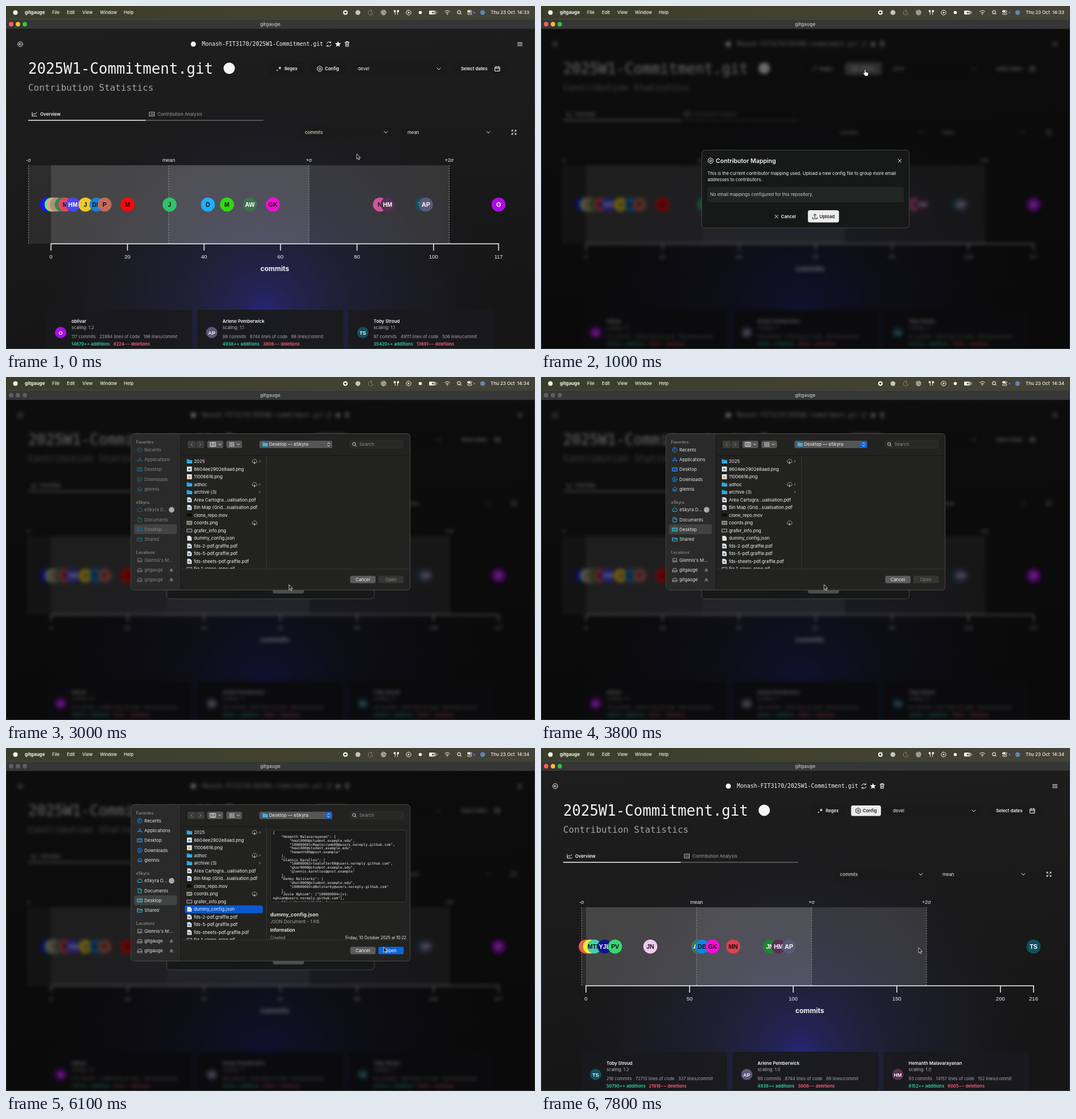
Animation, 929 px wide and 603 px high, one loop 8000 ms. Source, as an HTML page:

```html
<!DOCTYPE html>
<html lang="en">
<head>
<meta charset="utf-8">
<title>gitgauge</title>
<style>
html, body { margin: 0; width: 100%; height: 100%; overflow: hidden; background: #111; }
svg { display: block; width: 929px; height: 603px; font-family: Inter, sans-serif; }
text { white-space: pre; fill: #f4f4f4; }
.mono, .code { font-family: "DejaVu Sans Mono", monospace; }
.arial { font-family: "Liberation Sans", sans-serif; }
.b { font-weight: 600; }
.bb { font-weight: 700; }
.m { font-weight: 500; }
.mid { text-anchor: middle; }
.end { text-anchor: end; }
.line { fill: none; stroke: #f4f4f4; stroke-width: 1; stroke-linecap: round; stroke-linejoin: round; }
#side text { fill: #858585; }
#side .line { stroke: #2b6580; }
#side .loc .line { stroke: #777; }
#side.on .item { fill: #e4e4e4; }
#side.on .fav .line { stroke: #1f8dfb; }
#side.on .cloud .line { stroke: #35bede; }
#side.on .loc .line { stroke: #a0a0a0; }
</style>
</head>
<body>
<svg id="stage" viewBox="0 0 929 603" xmlns="http://www.w3.org/2000/svg"></svg>
<script>
const LOOP = 8000, FRAME = 100;

const text = (x, y, s, size = 7.8, cls = '', extra = '') =>
  `<text x="${x}" y="${y}" font-size="${size}" class="${cls}" ${extra}>${s}</text>`;
const rect = (x, y, w, h, fill, r = 0, extra = '') =>
  `<rect x="${x}" y="${y}" width="${w}" height="${h}" rx="${r}" fill="${fill}" ${extra}/>`;
const dot = (x, y, r, fill, extra = '') =>
  `<circle cx="${x}" cy="${y}" r="${r}" fill="${fill}" ${extra}/>`;
const line = (d, extra = '') => `<path class="line" d="${d}" ${extra}/>`;
const group = (id, body, extra = '') => `<g id="${id}" ${extra}>${body}</g>`;
const at = (x, y, body) => `<g transform="translate(${x} ${y})">${body}</g>`;
const chevron = (x, y, s = 3) => line(`M${x - s} ${y - s / 2}l${s} ${s}l${s} ${-s}`);
const cross = (x, y, s = 2.7) =>
  line(`M${x - s} ${y - s}l${2 * s} ${2 * s}m0 ${-2 * s}l${-2 * s} ${2 * s}`);
const hexagon = (x, y, ink = '#f4f4f4') => at(x, y,
  line('M0 -4.8L4.2 -2.4V2.4L0 4.8L-4.2 2.4V-2.4Z', `style="stroke:${ink}"`) +
  dot(0, 0, 1.7, 'none', `stroke="${ink}"`));

// Menu bar and window title

function menuBar() {
  const menus = [[81, 'File'], [107, 'Edit'], [134, 'View'], [165, 'Window'], [207, 'Help']];
  return rect(0, 0, 929, 24, 'url(#bar)') + rect(0, 22, 929, 2, '#39432f') +
    dot(16.5, 11.5, 4, '#f4f4f4') + text(33, 14, 'gitgauge', 8.2, 'bb') +
    menus.map(([x, s]) => text(x, 14, s, 7.7, 'm')).join('') +
    dot(596, 11.5, 4, '#f4f4f4') + dot(596, 11.5, 1.7, '#222') +
    dot(618, 11.5, 4.3, '#c4c4c0') +
    line('M642 7.5a4.3 4.3 0 1 0 2.6 6a4 4 0 0 1 -2.6 -6Z', 'stroke-opacity=".35"') +
    dot(663, 11.5, 5, '#8e8e8a') + line('M659 9q4 1 3 4t3 2M664 7.5q0 3 3.5 2.5', 'stroke-opacity=".45"') +
    line('M683.5 15V9.5M687.5 15V9.5', 'stroke-width="1.5"') + dot(682.6, 9, 1.9, '#f4f4f4') + dot(688.4, 9, 1.9, '#f4f4f4') +
    dot(707, 11.5, 4.2, 'none', 'stroke="#f4f4f4"') + '<path d="M705.7 9.3l3.6 2.2l-3.6 2.2Z" fill="#f4f4f4"/>' +
    dot(727.5, 11.5, 2.8, '#f4f4f4') +
    rect(743, 8, 12.5, 7, '#999', 2) + rect(743, 8, 9, 7, '#f4f4f4', 2) + rect(756.3, 10, 1.2, 3, '#999', .5) +
    '<path d="M750.5 8.5l-3 3.4h2l-1 2.8l3.2 -3.6h-2Z" fill="#222"/>' +
    line('M770.5 9.8q4.5 -3.7 9 0M772.4 12q2.6 -2 5.2 0', 'stroke-width="1.4"') + dot(775, 14, 1, '#f4f4f4') +
    dot(795.5, 10.8, 2.8, 'none', 'stroke="#f4f4f4" stroke-width="1.1"') + line('M797.7 13l2 2') +
    rect(810, 7.5, 8.5, 3.3, '#f4f4f4', 1.6) + rect(810.4, 12.2, 7.7, 2.7, 'none', 1.4, 'stroke="#f4f4f4" stroke-width=".9"') +
    dot(816.5, 9.1, 1, '#222') + dot(822.5, 11.5, 1.5, '#7b5cf0') +
    dot(837, 11.5, 4.2, '#5e86b8') +
    `<text id="clock" x="919" y="14" font-size="8" class="m end"></text>`;
}

function titleBar() {
  return rect(0, 24, 929, 17, '#363637') + rect(0, 40.3, 929, .7, '#111') +
    [9, 21, 33].map(x => dot(x, 32, 3.9, '#666', 'class="light"')).join('') +
    text(464, 34.6, 'gitgauge', 8.4, 'b mid', 'style="fill:#b4b4b4"');
}

// Page behind the dialogs

function header() {
  return dot(25, 67, 4.3, 'none', 'stroke="#f4f4f4"') + line('M27.3 67H23M24.8 65.2L23 67l1.8 1.8') +
    dot(329, 67, 4.5, '#f4f4f4') + text(344, 70.4, 'Monash-FIT3170/2025W1-Commitment.git', 9.83, 'mono') +
    line('M563.3 66a4 4 0 0 1 7 -1.5v-2m0 2h-2M570.8 68a4 4 0 0 1 -7 1.5v2m0 -2h2') +
    '<path d="M583 61.8l1.5 3.4l3.8 .4l-2.9 2.5l.9 3.7l-3.3 -2l-3.3 2l.9 -3.7l-2.9 -2.5l3.8 -.4Z" fill="#f4f4f4"/>' +
    line('M595.3 64h7.4M597.5 64v-1.6h3V64M596.2 64l.4 7h4.8l.4 -7M598.2 66v3M599.9 66v3') +
    line('M898.5 64.3h8M898.5 67h8M898.5 69.7h8') +
    text(39, 119, '2025W1-Commitment.git', 25.7, 'mono') + dot(392, 109.5, 10, '#f4f4f4') +
    text(39, 149, 'Contribution Statistics', 15.9, 'mono', 'style="fill:#a3a3a3"');
}

function controls() {
  const box = '#1a1a1b', grey = 'style="fill:#a0a0a0"';
  const regex = rect(462, 99, 62, 22, box, 3) + dot(476.2, 113, 1.1, '#f4f4f4') +
    line('M481 107v4M479.3 108l3.4 2M482.7 108l-3.4 2') + text(489, 113.3, 'Regex', 7.6, 'b');
  return group('regex', regex) +
    group('confIdle', rect(534, 99, 64, 22, box, 4, 'id="confBox"') + hexagon(551, 110.5) + text(560, 113.3, 'Config', 7.7, 'b')) +
    group('confOpen', rect(544.5, 101, 52.5, 18.5, '#ececec', 3.5) + hexagon(557, 110.5, '#1a1a1a') +
      text(565, 113.3, 'Config', 7.7, 'b', 'style="fill:#1a1a1a"')) +
    rect(607, 99, 169, 22, box, 3) + text(618, 113.3, 'devel') + chevron(760, 110.5) +
    rect(788, 99, 91, 22, box, 3) + text(799, 113.3, 'Select dates', 7.8, 'b') +
    line('M859 107.3h8v7.2h-8ZM859 109.6h8M861 106v2M865 106v2M864 112.2h1') +
    line('M46 187v6.5h8M46.5 191.5l2.5 -2.5l2 1.5l3 -3.5') + text(60, 192.8, 'Overview', 7.8, 'b') +
    line('M252 186.5h8.5v7h-8.5ZM254 189h2M254 191.2h2M257.5 189h1.5M257.5 191.2h1.5', 'stroke-opacity=".7"') +
    text(266, 192.8, 'Contribution Analysis', 7.8, '', grey) +
    rect(39, 200.2, 206.5, 1.5, '#f4f4f4') + rect(245.5, 200.5, 206.5, 1, '#8a8a8a') +
    rect(515, 211, 168, 22, box, 3) + text(525, 224.5, 'commits') + chevron(667, 222) +
    rect(695, 211, 168, 22, box, 3) + text(705, 224.5, 'mean') + chevron(847, 222) +
    rect(880, 211, 24, 22, box, 3) +
    line('M890.8 220.8l-2.6 -2.6m0 2v-2h2M893.2 220.8l2.6 -2.6m-2 0h2v2M890.8 223.2l-2.6 2.6m0 -2v2h2M893.2 223.2l2.6 2.6m-2 0h2v-2');
}

function chart(marks, ticks, max, people) {
  const names = ['-σ', 'mean', '+σ', '+2σ'];
  const [a, b, c, d] = marks;
  const band = (x1, x2, o) => rect(x1, 280, x2 - x1, 138, '#fff', 0, `fill-opacity="${o}"`);
  let s = band(a, 79, .08) + band(79, b, .19) + band(b, c, .225) + band(c, d, .12);
  marks.forEach((x, i) => {
    s += `<path d="M${x} 280V418" stroke="#aaa" stroke-width=".8" stroke-dasharray="2.5 2"/>` +
      text(x, 274, names[i], 8.9, 'mid arial');
  });
  const px = v => 79 + 786 * v / max;
  s += rect(78.3, 417.3, 787.4, 1.5, '#f4f4f4');
  for (const v of ticks)
    s += rect(px(v) - .75, 418, 1.5, 12, '#f4f4f4') + text(px(v), 444, v, 9.5, 'mid arial');
  s += text(472, 465.5, 'commits', 12, 'bb mid');
  for (const [x, who, fill, dark] of people)
    s += dot(x, 349, 12.3, fill) +
      text(x, 352.7, who, 10.6, 'mid arial bb', `style="fill:${dark ? '#111' : '#fff'}"`);
  return s;
}

function card(x, [who, name, scale, fill, commits, loc, per, add, del]) {
  return rect(x, 534, 256, 80, '#1a1a1e', 4, 'fill-opacity=".95"') + dot(x + 25, 574, 10, fill) +
    text(x + 25, 577.5, who, 9, 'mid arial bb') + text(x + 44, 556.7, name, 7.8, 'b') +
    text(x + 44, 567.5, `scaling: ${scale}`, 7.6, '', 'style="fill:#b8b8b8"') +
    text(x + 44, 584, `${commits} commits<tspan dx="6.5">${loc} lines of code</tspan><tspan dx="6.5">${per} lines/commit</tspan>`,
      7.5, '', 'style="fill:#a9a9a9"') +
    text(x + 44, 597.3, `<tspan fill="#34d399">${add}++ additions</tspan><tspan dx="6" fill="#ff6175">${del}−− deletions</tspan>`, 7.5, 'b');
}

const cards = list => list.map((c, i) => card(71 + 265.3 * i, c)).join('');

const AP = ['AP', 'Arlene Pemberwick', '1.1', '#5c5878', 98, 8744, 89, 4938, 3806];
const before = chart([39.5, 285.8, 532, 778.3], [0, 20, 40, 60, 80, 100, 117], 117, [
  [72, 'C', '#2412f0'], [80, 'G', '#52f56e', 1], [84, '', '#e8a58a'], [89, 'C', '#a8957b', 1],
  [98, 'J', '#2a8a4a', 1], [104, 'M', '#e2455c', 1], [117.5, 'HM', '#4747f5'], [139.5, 'J', '#ecc92c', 1],
  [159, 'DB', '#1683d8', 1], [173, 'P', '#c26b5c', 1], [213.4, 'M', '#f80808', 1], [287.3, 'J', '#2fc46c', 1],
  [354.5, 'D', '#1eb0fb', 1], [388, 'M', '#2fd90e', 1], [428.3, 'AW', '#3e734c'], [468.7, 'GK', '#f50cd6', 1],
  [656.7, 'N', '#cf559c', 1], [670.2, 'HM', '#583054'], [731, 'TS', '#12505f'], [737.4, 'AP', '#5c5878'],
  [865, 'O', '#ad0ce6']
]) + cards([
  ['O', 'oblivar', '1.2', '#ad0ce6', 117, 22894, 196, 14670, 8224], AP,
  ['TS', 'Toby Stroud', '1.1', '#12505f', 97, 49111, 506, 35420, 13691]
]);
const after = chart([71.3, 273.2, 475.1, 677], [0, 50, 100, 150, 200, 216], 216, [
  [78.5, 'IN', '#e4604c', 1], [86, '', '#f0f030', 1], [93.5, 'MTN', '#43d0ae', 1], [111.5, 'YJL', '#10148c'],
  [130, 'PV', '#38d773', 1], [192, 'JN', '#f2c9f0', 1], [276, 'AW', '#3e734c'], [283, 'DB', '#0f84e6', 1],
  [301.2, 'GK', '#f50cd6', 1], [337.5, 'MN', '#e0404e', 1], [402, 'JN', '#1f8431'], [417.2, 'HM', '#583054'],
  [435.4, 'AP', '#5c5878'], [865, 'TS', '#12505f']
]) + cards([
  ['TS', 'Toby Stroud', '1.2', '#12505f', 216, 72713, 337, 50795, 21918],
  AP.map((v, i) => i === 2 ? '1.0' : v),
  ['HM', 'Hemanth Malavarayanan', '1.0', '#583054', 93, 14157, 152, 8152, 6005]
]);

// Mapping dialog

function dialog() {
  return rect(282.3, 253.3, 364.4, 136.8, '#171918', 6, 'stroke="#444645"') +
    hexagon(298, 272) + text(307, 276, 'Contributor Mapping', 10.5, 'b') + cross(630, 272) +
    text(292.5, 297.3, 'This is the current contributor mapping used. Upload a new config file to group more email', 7.74) +
    text(292.5, 307.8, 'addresses to contributors.', 7.74) +
    rect(292, 318, 345, 27, '#232525', 3) +
    text(297, 334.3, 'No email mappings configured for this repository.', 7.74, '', 'style="fill:#cfcfcf"') +
    rect(400, 359, 59, 21.5, '#151716', 3) + cross(413.5, 370) + text(421.5, 372.8, 'Cancel', 7.7, 'b') +
    group('upload', rect(468.7, 359, 54.6, 21.5, '#ededed', 3.5) +
      line('M481 372v-6M478.6 368l2.4 -2.4l2.4 2.4M477 371.5v2.5h8v-2.5', 'style="stroke:#1a1a1a"') +
      text(489, 372.8, 'Upload', 7.8, 'b', 'style="fill:#1a1a1a"'));
}

// File picker

const glyph = {
  clock: 'M4 0a4 4 0 1 0 -8 0a4 4 0 1 0 8 0M0 -2.3V0H-1.8',
  app: 'M-3.5 3.5L.5 -3.5M3.5 3.5L-.5 -3.5M-4 1.3h8',
  desk: 'M-4.2 -3h8.4v6h-8.4ZM-4 1.4h8M-4 -1.4h8',
  down: 'M4 0a4 4 0 1 0 -8 0a4 4 0 1 0 8 0M0 -2V2M-1.6 .5L0 2l1.6 -1.5',
  home: 'M-4 0L0 -3.8L4 0M-3 -.8V3.5h2v-2.5h2v2.5h2V-.8',
  cloud: 'M-2.6 2.8h5.2a2 2 0 0 0 .5 -3.9a2.8 2.8 0 0 0 -5.3 -.6a2.3 2.3 0 0 0 -.4 4.5Z',
  doc: 'M-2.8 -3.8h3.4l2.4 2.4v5.2h-5.8ZM.4 -3.8v2.6h2.6',
  share: 'M-4 -2.8h3l1 1h4.2v5h-8.2ZM-4 -.4h8',
  mac: 'M-3.2 -3h6.4v4.4h-6.4ZM-4.4 3h8.8',
  disk: 'M-4 1l1.4 -3.8h5.2L4 1v2.2h-8ZM-4 1h8'
};
const icon = (name, x, y, extra = '') => at(x, y, line(glyph[name], extra));

function sidebar() {
  const row = ([name, y, s]) => icon(name, 235, y) + text(243, y + 2.9, s, 7.8, 'item');
  const head = (y, s) => text(228.5, y, s, 6.9, 'b');
  const eject = y => `<path d="M287.5 ${y}l2.9 -3l2.9 3ZM287.5 ${y + 1}h5.8v1.2h-5.8Z" fill="#8d8d8d"/>`;
  const rows = (cls, list) => `<g class="${cls}">${list.map(row).join('')}</g>`;
  return rect(225, 259, 75, 17.3, '#414342', 3) +
    head(117, 'Favorites') + head(222.5, 'eSkyra') + head(311, 'Locations') +
    rows('fav', [['clock', 128, 'Recents'], ['app', 145.3, 'Applications'], ['desk', 162.5, 'Desktop'],
      ['down', 180, 'Downloads'], ['home', 197, 'glennis']]) +
    rows('cloud', [['cloud', 233.5, 'eSkyra D...'], ['doc', 251, 'Documents'], ['desk', 268, 'Desktop'], ['share', 285.3, 'Shared']]) +
    rows('loc', [['mac', 322, "Glennis's M..."], ['disk', 339.5, 'gitgauge'], ['disk', 356.5, 'gitgauge']]) +
    dot(290.8, 233.5, 4.9, '#a9a9a9') + eject(339.5) + eject(356.5);
}

function fileList() {
  const files = ['2025', '8604ee2902e8aad.png', '11006616.png', 'adhoc', 'archive (3)',
    'Area Cartogra...ualisation.pdf', 'Bin Map (Grid...sualisation.pdf', 'clone_repo.mov', 'coords.png',
    'grafer_info.png', 'dummy_config.json', 'fds-2-pdf.graffle.pdf', 'fds-5-pdf.graffle.pdf',
    'fds-sheets-pdf.graffle.pdf', 'fig_1_clone_repo.gif'];
  return files.map((name, i) => {
    const y = 148.2 + 13.53 * i;
    let s = text(330, y + 2.8, name, 7.85);
    if (!name.includes('.')) {
      s += `<path d="M317.5 ${y - 3.5}h3.2l1 1.2h5.3v6h-9.5Z" fill="#33aee6"/>` + rect(317.5, y - 1.2, 9.5, .6, '#1c83b8') +
        line(`M445 ${y - 1.6}l1.6 1.6l-1.6 1.6`, 'stroke-opacity=".6"');
    } else if (/pdf|json/.test(name)) {
      s += `<path d="M318.3 ${y - 4.3}h5l2.7 2.7v5.9h-7.7Z" fill="#ececec"/>` +
        (name.includes('pdf') ? rect(320, y - .8, 4, 3, '#6a87b5') : rect(320, y, 4, .7, '#aaa'));
    } else if (i < 3) {
      s += rect(317.8, y - 4.2, 8.6, 8.6, '#e9edf0') + dot(322, y + .5, 2.1, i === 1 ? '#3a86c8' : '#e0a030');
    } else if (i === 7) {
      s += rect(317.5, y - 3, 9, 5.5, '#0c0c0c');
    } else {
      s += rect(317.8, y - 2.8, 8.6, 5.6, i === 8 ? '#67705a' : '#333', 0, 'stroke="#ddd" stroke-width=".7"');
    }
    if ([0, 3, 8].includes(i)) s += icon('cloud', 436.5, y - .4, 'stroke-opacity=".55"') +
      line(`M436.5 ${y}v4.3m-1.5 -1.5l1.5 1.5l1.5 -1.5`, 'stroke-opacity=".55"');
    return s;
  }).join('');
}

function preview() {
  const hub = '@users.noreply.github.com', uni = '@student.example.edu';
  const block = (name, mails) =>
    [`    "${name}": [`, ...mails.map((m, i) => `        "${m}"${i < mails.length - 1 ? ',' : ''}`), '    ],'];
  const lines = ['{',
    ...block('Hemanth Malavarayanan', ['hmal0000' + uni, '100000001+Maplecrumb00' + hub, 'hmal000' + uni, 'hemanth00@post.example']),
    ...block('Glennis Karellos', ['100000002+tealotter00' + hub, 'gkar0000' + uni, 'glennis.karellos@post.example']),
    ...block('Denby Bolsterky', ['dbol0000' + uni, '100000003+dBolsterky' + hub]),
    '    "Jovie Nghiem": ["100000004+jvi-', `nghiem${hub}"],`, '    "Anvi Weerakondara": ['];
  return rect(464.5, 144.5, 238.5, 126, '#1a1b1a', 2, 'stroke="#3a3b3a" stroke-width=".8"') +
    `<g clip-path="url(#code)">${lines.map((s, i) => text(468.5, 151.3 + 6.76 * i, s, 6.15, 'code')).join('')}</g>` +
    text(464, 296, 'dummy_config.json', 9, 'b') +
    text(464, 308, 'JSON Document - 1 KB', 7.9, '', 'style="fill:#a5a5a5"') + text(464, 323, 'Information', 7.8, 'b') +
    text(464, 336.4, 'Created', 7, '', 'style="fill:#a0a0a0"') +
    text(703, 336.4, 'Friday, 10 October 2025 at 10:22', 7, 'end');
}

function picker() {
  const grey = '#545655';
  return rect(219.3, 99.5, 490.4, 275, '#222321', 6, 'stroke="#505250" stroke-width=".9"') +
    '<path d="M307 100H225.3a5.5 5.5 0 0 0 -5.5 5.5V368.5a5.5 5.5 0 0 0 5.5 5.5H307Z" fill="#292a29"/>' +
    rect(306.7, 100, .8, 274, '#111') + rect(307.5, 137.7, 402, .8, '#131413') +
    rect(457, 138, .8, 199, '#3a3b3a') + rect(307.5, 337, 402, .8, '#343534') +
    group('side', sidebar()) +
    rect(319, 112, 14.3, 13, '#3b3c3b', 2) + rect(334, 112, 14.3, 13, '#3b3c3b', 2) +
    line('M327.3 115.7l-2.6 2.8l2.6 2.8M340 115.7l2.6 2.8l-2.6 2.8', 'stroke-opacity=".4"') +
    rect(353.5, 112, 28, 13, grey, 3) + line('M359 115.2h9v6.6h-9ZM362 115.2v6.6M365 115.2v6.6') + chevron(375.5, 118.5, 2) +
    rect(387, 112, 27.5, 13, grey, 3) + chevron(408, 118.5, 2) +
    [0, 1, 2].map(i => [0, 1, 2].map(j => rect(392.5 + 3.1 * i, 114.8 + 2.9 * j, 2, 1.8, '#ddd')).join('')).join('') +
    rect(445, 112, 128, 13, grey, 3) + '<path d="M450.5 114.8h3.2l1 1.2h4.8v6h-9Z" fill="#37b3e8"/>' +
    text(462, 121.3, 'Desktop — eSkyra', 7.9) + rect(561, 113, 11, 11, grey, 2.5, 'id="stepper"') +
    line('M564.6 117.2l1.9 -2l1.9 2M564.6 119.8l1.9 2l1.9 -2') +
    rect(604, 112, 93.5, 13, '#282927', 3, 'stroke="#353634" stroke-width=".7"') +
    dot(611.3, 117.8, 2.6, 'none', 'stroke="#ddd"') + line('M613.3 119.9l2 2') +
    text(620.5, 121.3, 'Search', 7.9, '', 'style="fill:#8b8b8b"') +
    `<g clip-path="url(#files)">${rect(314, 276.8, 137, 13.6, '#0a59d1', 3, 'id="pick"')}${fileList()}${group('info', preview())}</g>` +
    rect(604.5, 349.5, 44.5, 13, '#5b5d5c', 3) + text(626.5, 358.8, 'Cancel', 7.8, 'mid') +
    rect(654, 349.5, 44.5, 13, '#343634', 3, 'id="openBox"') + text(676, 358.8, 'Open', 7.8, 'mid', 'id="openText"');
}

const arrow = '<path d="M0 0V9.2L2.1 7.3L3.5 10.4L5 9.7L3.6 6.7H6.4Z" fill="#111" stroke="#f4f4f4" stroke-width=".8"/>';
const hand = '<path d="M0 1q0 -1.2 1 -1.2t1 1.2v3.2q1.2 -.6 1.7 .3q1.1 -.4 1.6 .5q1.4 -.3 1.4 1.2v2.3q0 2.6 -2 2.6h-2.5q-1.2 0 -2 -1.4l-2 -3q-.6 -1 .2 -1.4t1.6 .7Z" fill="#f6f6f6" stroke="#111" stroke-width=".6"/>';

document.getElementById('stage').innerHTML = `<defs>
  <linearGradient id="bar"><stop offset="0" stop-color="#393d2a"/><stop offset=".5" stop-color="#41412e"/><stop offset="1" stop-color="#454338"/></linearGradient>
  <linearGradient id="base" x2=".2" y2="1"><stop offset="0" stop-color="#1e1e1e"/><stop offset="1" stop-color="#161617"/></linearGradient>
  <radialGradient id="glow" gradientUnits="userSpaceOnUse" cx="455" cy="540" r="400">
    <stop offset="0" stop-color="#26267e" stop-opacity=".95"/><stop offset=".12" stop-color="#25255e" stop-opacity=".85"/>
    <stop offset=".35" stop-color="#242446" stop-opacity=".65"/><stop offset=".65" stop-color="#212134" stop-opacity=".45"/>
    <stop offset="1" stop-color="#1c1c22" stop-opacity="0"/></radialGradient>
  <clipPath id="window"><rect y="41" width="929" height="562"/></clipPath>
  <clipPath id="files"><rect x="308" y="139" width="401" height="198"/></clipPath>
  <clipPath id="code"><rect x="465" y="145" width="238" height="125"/></clipPath>
</defs>` +
  rect(0, 41, 929, 562, 'url(#base)') + rect(0, 41, 929, 562, 'url(#glow)') +
  `<g clip-path="url(#window)">${group('page', header() + controls() + group('before', before) + group('after', after))}</g>` +
  rect(0, 41, 929, 562, '#000', 0, 'id="shade"') + menuBar() + titleBar() +
  group('dialog', dialog()) + group('picker', picker()) +
  group('cursor', group('arrow', arrow) + group('hand', hand)) +
  rect(.4, 23.6, 928.2, 579, 'none', 4, 'stroke="#4a4c4a" stroke-width=".7"');

const el = id => document.getElementById(id);
const show = (id, on) => { el(id).style.display = on ? '' : 'none'; };
const clamp = v => Math.max(0, Math.min(1, v));
const ramp = (t, a, b) => clamp((t - a) / (b - a));
const lights = [...document.querySelectorAll('.light')];

const path = [[0, 616, 260], [700, 568, 112], [1200, 568, 112], [2200, 497, 365], [4200, 497, 365],
  [4700, 360, 285], [5300, 360, 285], [6000, 663, 350], [6500, 663, 350], [6700, 663, 351], [LOOP, 663, 351]];

function pointer(t) {
  const i = path.findIndex((p, n) => n && t < p[0]);
  const [t0, x0, y0] = path[i - 1], [t1, x1, y1] = path[i];
  const u = (t - t0) / (t1 - t0), e = u * u * (3 - 2 * u);
  return [x0 + (x1 - x0) * e, y0 + (y1 - y0) * e];
}

function draw(t) {
  const open = ramp(t, 800, 1000) * (1 - ramp(t, 7500, 7800));
  const picking = t >= 2800 && t < 6700, active = t >= 3300, chosen = t >= 5100;
  const shifted = t >= 1100;

  el('page').style.filter = open ? `blur(${3 * open}px)` : 'none';
  el('shade').setAttribute('opacity', .56 * open);
  el('dialog').setAttribute('opacity', open);
  el('upload').setAttribute('opacity', picking ? .25 : 1);
  el('regex').setAttribute('transform', `translate(${shifted ? 11 : 0} 0)`);
  show('confIdle', !shifted);
  show('confOpen', shifted);
  el('confBox').setAttribute('fill', t >= 700 ? '#6c6c6c' : '#1a1a1b');
  show('before', t < 7600);
  show('after', t >= 7600);
  el('clock').textContent = 'Thu 23 Oct  14:' + (t < 1500 ? 33 : 34);
  lights.forEach((c, i) => c.setAttribute('fill', picking ? '#5e5e60' : ['#fe5f58', '#febc2e', '#28c840'][i]));

  show('picker', picking);
  el('side').setAttribute('class', active ? 'on' : '');
  el('stepper').setAttribute('fill', active ? '#0b66dc' : '#545655');
  show('pick', chosen);
  show('info', chosen);
  el('openBox').setAttribute('fill', chosen ? '#0c66de' : '#343634');
  el('openText').style.fill = chosen ? '#fff' : '#858585';

  const [x, y] = pointer(t);
  const pointing = t >= 700 && t < 1300 || t >= 2100 && t < 2800;
  el('cursor').setAttribute('transform', `translate(${x} ${y})`);
  show('hand', pointing);
  show('arrow', !pointing);
}

let start, last = -1;
function tick(now) {
  start ??= now;
  const t = Math.floor((now - start) % LOOP / FRAME) * FRAME;
  if (t !== last) draw(last = t);
  requestAnimationFrame(tick);
}
draw(0);
requestAnimationFrame(tick);
</script>
</body>
</html>
```
